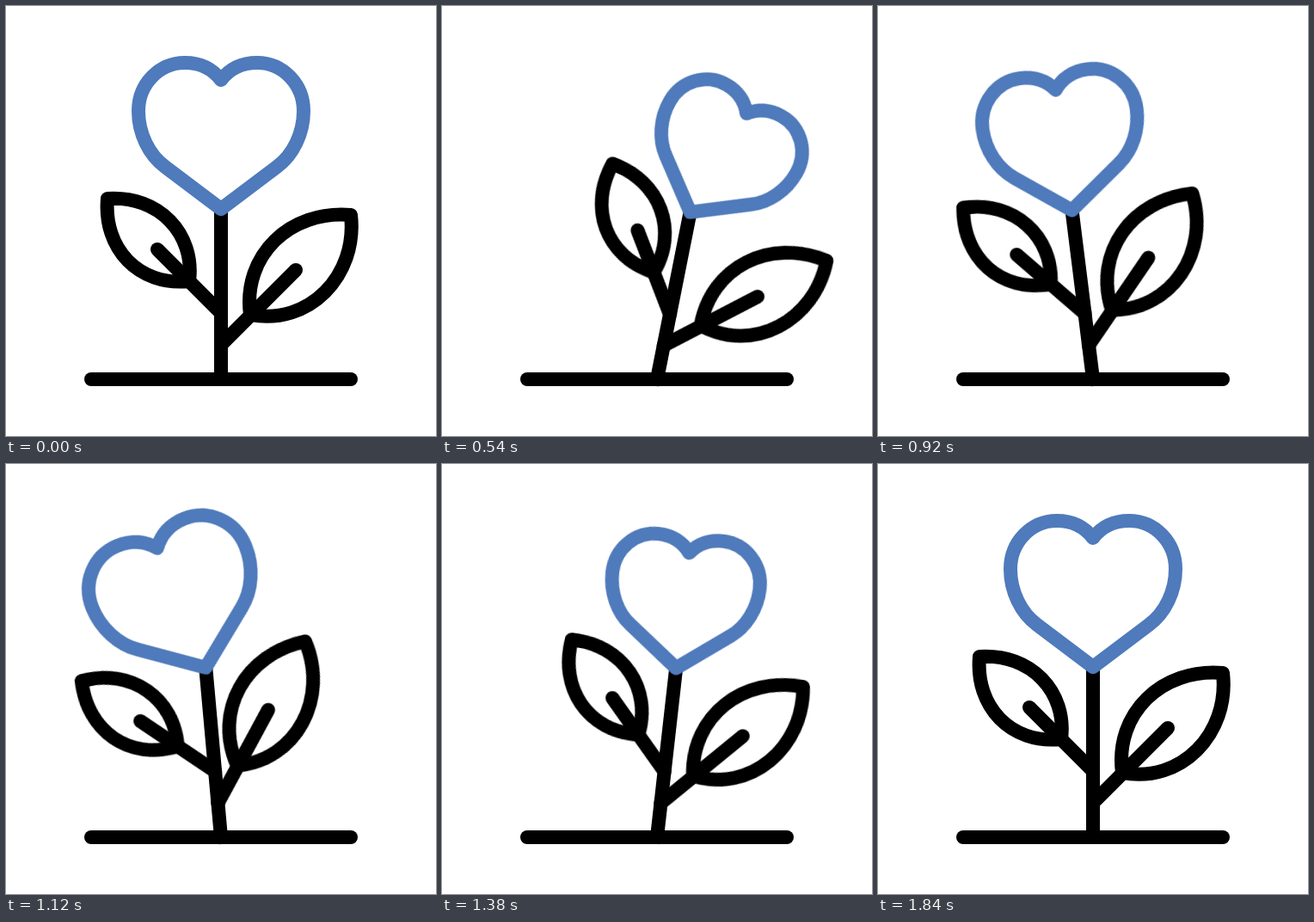
Animation of 500 by 500 pixels, one loop 2000 ms. Source, as an HTML page:

```html
<!DOCTYPE html>
<html lang="en">
<head>
<meta charset="utf-8">
<title>Swaying heart flower</title>
<style>
  html, body { margin: 0; width: 100%; height: 100%; overflow: hidden; background: #fff; }
  svg { display: block; width: 100%; height: 100%; }
  path { fill: none; stroke: #000; stroke-width: 16; stroke-linecap: round; stroke-linejoin: round; }

  .plant, .part { animation: 2s cubic-bezier(.333, 0, .667, 1) infinite; }
  .plant { transform-origin: 250px 434px; animation-name: sway; }
  .part { animation-name: bend; }

  /* Bend of each part relative to the stem: first right, left, second right */
  .left  { transform-origin: 250px 357px; --r1: 15.8deg; --l: -6deg; --r2: 7deg; }
  .right { transform-origin: 250px 394px; --r1: 7.8deg; --l: -11.5deg; --r2: 3.7deg; }
  .heart { transform-origin: 250px 236px; --r1: 23deg; --l: -17deg; --r2: 7deg; }
  .part.heart { animation-name: bend, shrink; }
  .heart path { stroke: #4f7abb; vector-effect: non-scaling-stroke; }

  @keyframes sway {
    0%, 8%    { transform: rotate(0deg); }
    30.5%     { transform: rotate(12deg); }
    49%       { transform: rotate(-8.5deg); }
    73%       { transform: rotate(7.6deg); }
    90%, 100% { transform: rotate(0deg); }
  }
  @keyframes bend {
    0%, 9.5%  { transform: rotate(0deg); }
    34%       { transform: rotate(var(--r1)); }
    55.5%     { transform: rotate(var(--l)); }
    76.5%     { transform: rotate(var(--r2)); }
    92%, 100% { transform: rotate(0deg); }
  }
  @keyframes shrink {
    0%, 7.5%, 55.5%, 92%, 100% { scale: 1; }
    34%, 76.5% { scale: .857; }
  }
</style>
</head>
<body>
<svg viewBox="0 0 500 500">
  <path d="M99 434H401"/>
  <g class="plant">
    <path d="M250 434V236"/>
    <g class="part left">
      <path d="M118 224C178 220 220 265 213 320C154 326 113 282 118 224Z"/>
      <path d="M250 357L176 283"/>
    </g>
    <g class="part right">
      <path d="M401 243C330 237 275 290 284 359C352 372 409 314 401 243Z"/>
      <path d="M250 394L337 307"/>
    </g>
    <g class="part heart">
      <path d="M250 236L185 187C166 173 154 148 154 122C154 91 178 66 208 66C225 66 240 73 250 86C260 73 275 66 292 66C322 66 346 91 346 122C346 148 334 173 315 187Z"/>
    </g>
  </g>
</svg>
</body>
</html>
```
